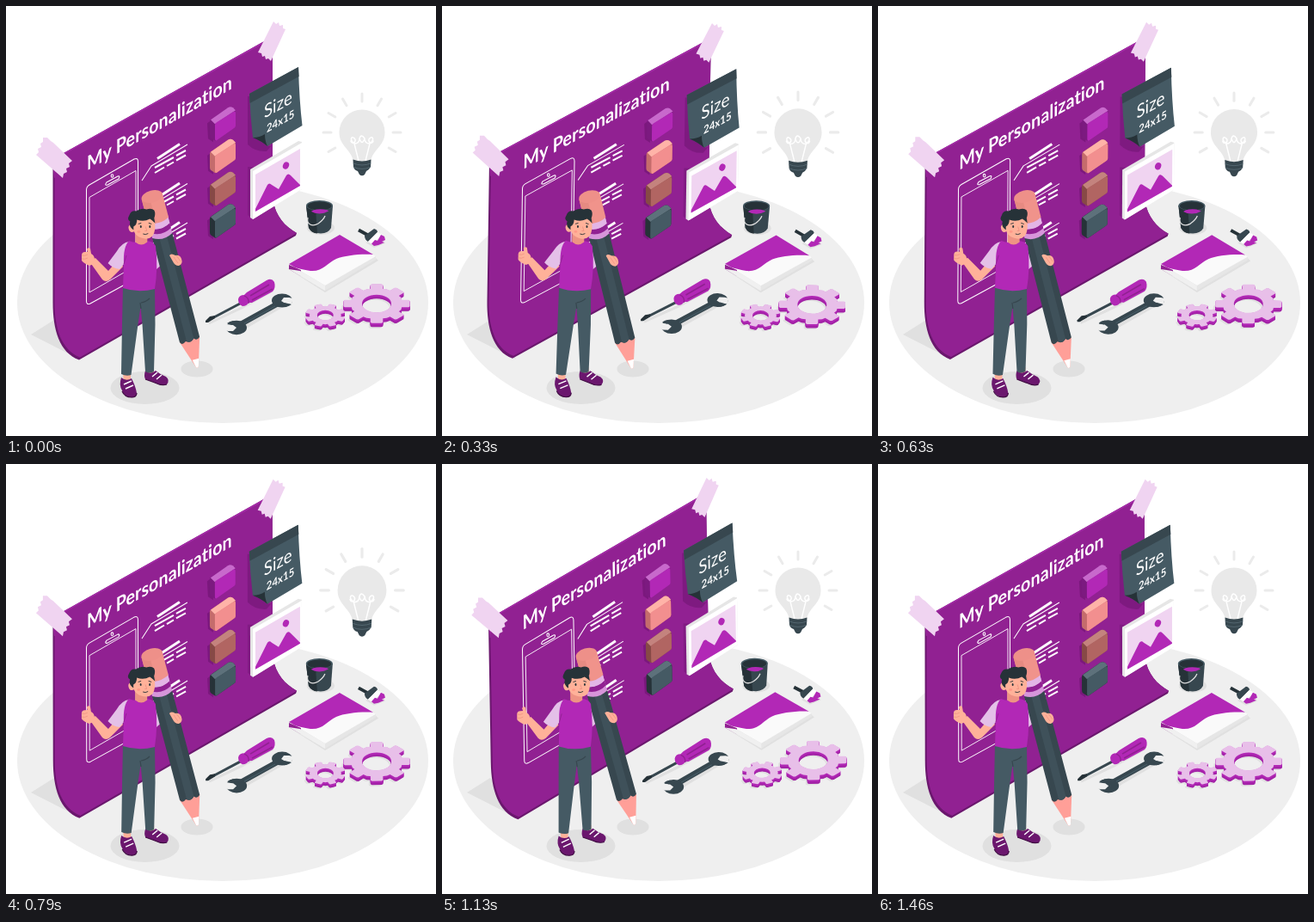
Write an HTML page with a canvas that moves like this. It is 500 px wide and 500 px high and loops after 1.5 s.

```html
<!DOCTYPE html>
<html lang="en">
<head>
<meta charset="utf-8">
<title>My Personalization</title>
<style>
html, body { margin: 0; width: 100%; height: 100%; overflow: hidden; background: #fff; }
canvas { display: block; width: 500px; height: 500px; }
</style>
</head>
<body>
<canvas id="stage"></canvas>
<script>
const LOOP = 1500;
const canvas = document.getElementById('stage');
const ctx = canvas.getContext('2d');
const ratio = window.devicePixelRatio || 1;
canvas.width = canvas.height = 500 * ratio;

const C = {
  main: '#b228b6', poster: '#912192', edge: '#6b176e', rim: '#a52ba8', pale: '#f0d4f1', gear: '#e8bfe9',
  slate: '#455a64', dark: '#37474f', ink: '#263238',
  skin: '#ffb199', skinShade: '#ee9384', floor: '#efefef', shadow: '#e0e0e0'
};

function fill(path, color) {
  ctx.fillStyle = color;
  ctx.fill(new Path2D(path));
}

function line(path, color, width = 1) {
  ctx.strokeStyle = color;
  ctx.lineWidth = width;
  ctx.stroke(new Path2D(path));
}

function oval(x, y, rx, ry, color, turn = 0) {
  ctx.beginPath();
  ctx.ellipse(x, y, rx, ry, turn, 0, Math.PI * 2);
  ctx.fillStyle = color;
  ctx.fill();
}

function group(draw) {
  ctx.save();
  draw();
  ctx.restore();
}

function shift(x, y, draw) {
  group(() => {
    ctx.translate(x, y);
    draw();
  });
}

function swing(x, y, angle, draw) {
  group(() => {
    ctx.translate(x, y);
    ctx.rotate(angle);
    ctx.translate(-x, -y);
    draw();
  });
}

function wallText(text, x, y, font) {
  group(() => {
    ctx.transform(0.866, -0.49, 0, 1, x, y);
    ctx.font = font;
    ctx.letterSpacing = '0.1px';
    ctx.fillStyle = '#fff';
    ctx.fillText(text, 0, 0);
  });
}

// Linear interpolation through [position, value] keys.
function track(keys, p) {
  const i = keys.findIndex(key => key[0] >= p);
  if (i <= 0) return keys[0][1];
  const [p0, v0] = keys[i - 1], [p1, v1] = keys[i];
  return v0 + (v1 - v0) * (p - p0) / (p1 - p0);
}

function drawFloor() {
  oval(252, 345, 239, 140, C.floor);
  fill('M29 382 L56 365 L70 380 L86 411 Z', C.shadow);
  oval(161.5, 444, 40, 19, C.shadow);
  oval(222, 422, 18.5, 9.5, C.shadow);
}

function drawPhone() {
  line('M93.5 214 Q93.5 210 97 208 L149 178 Q153.5 176 153.5 181 V308 Q153 315 149 318 L98 346 Q93.5 348 93.5 343 Z', '#fff', 1);
  line('M97 222.5 L151 191.5 V302 L97 333 Z', '#fff', 0.9);
  line('M117 205 L130 198 Q133 197 131 201 L118 208 Q114 209 117 205 Z', '#fff', 1.1);
  ctx.beginPath();
  ctx.ellipse(123.5, 197.5, 1.3, 1.8, 0, 0, 7);
  ctx.stroke();
}

function drawNotes() {
  line('M158 203 L169 186 L211 161', '#fff', 1);
  for (let i = 0; i < 3; i++) shift(0, i * 45.5, () => {
    line('M176 177.5 L202 160.5', '#fff', 3);
    if (i) line('M171 185 L211 161', '#fff', 1);
    line('M173 188 L195 176 M198 174 L209 168 M173 194 L184 187.5 M187 186 L195 181.5 M198 179.5 L209 173.5', '#fff', 2);
  });
}

function drawCube(y, front, top, side) {
  shift(0, y, () => {
    fill('M234 137 L241 132 V159 L235 155 Z', 'rgba(60,0,65,.25)');
    fill('M237 135 Q237 133 239 132 L258 119 Q261 117 264 119 L266 121 Q267 122 267 124 V140 Q267 142 265 143 L245 157 Q243 158 241 156 L238 154 Q237 153 237 151 Z', side);
    fill('M238 133 L258 119 Q261 117 264 119 L267 122 L243 138 Z', top);
    fill('M243 139 Q243 137 245 136 L264 124 Q267 122 267 125 V140 Q267 142 265 143 L245 157 Q243 158 243 155 Z', front);
  });
}

function drawNoteSheet() {
  fill('M281 105 L290 105 L292 150 L306 163 L309 162 L303 169 Q290 170 281 161 Z', 'rgba(60,0,65,.22)');
  fill('M283 102 L340 71 Q341 110 344.5 139 L304 163 Q298 157 287 153 Q284 128 283 102 Z', C.slate);
  fill('M283 102 L340 71 L340.6 82 L283.6 113 Z', C.dark);
  fill('M287 153 Q295 153 301 149 Q301 157 304 163 Q297 157 287 153 Z', C.ink);
  wallText('Size', 300, 131, '400 21.5px Lato, sans-serif');
  wallText('24x15', 303, 147.5, '700 13px Lato, sans-serif');
}

function drawPicture() {
  fill('M281 187 L288 187 V249 L281 243 Z', 'rgba(60,0,65,.18)');
  fill('M284 190 L340 157 L344 158 V213 L287 248 L284 246 Z', '#e6e6e6');
  fill('M287 192 L344 159 V213 L287 248 Z', '#fff');
  fill('M290 196 L342 166 V209 L290 239 Z', C.pale);
  fill('M290 236 L304 208 Q306 205 309 208 L317 213 L326 197 Q328 194 331 197 L342 208 V209 L290 239 Z', C.main);
  oval(325.5, 185.5, 3.5, 4.3, C.main, 0.4);
}

function drawTapes() {
  fill('M43 153 L48 153 L52 157 L55 159 L77 180 L73 183 L74 187 L70 189 L71 193 L67 195 L66 200 L35 173 L38 170 L37 166 L41 164 L40 160 L43 158 Z', C.pale);
  fill('M311 18 L314 21 L317 19 L318 23 L322 22 L322 26 L325 27 L308 64 L305 61 L302 62 L301 58 L298 59 L297 55 L293 54 Z', C.pale);
}

function drawPoster() {
  fill('M54.5 178 L310 35.5 V225 C314 245 324 256 338 264 L337 267 L85 411.5 C62 403 54.5 376 54.5 345 Z', C.edge);
  fill('M54.5 178 L310 35.5 V60 L56 200 Z', C.rim);
  fill('M56.5 178.5 L310 37.5 V225 C314 245 324 256 338 264 L86 408.5 C64 400 56.5 374 56.5 345 Z', C.poster);
  wallText('My Personalization', 94, 191.5, '700 22.7px Lato, sans-serif');
  drawPhone();
  drawNotes();
  drawCube(-0.7, C.main, '#c869cc', '#7c1a80');
  drawCube(36.8, '#f28f8f', '#ffb3a8', '#c56c6c');
  drawCube(74.8, '#b16562', '#c4837e', '#874946');
  drawCube(112.3, C.slate, '#5d717b', C.ink);
  drawNoteSheet();
  drawPicture();
  drawTapes();
}

function drawBulb() {
  ctx.lineCap = 'round';
  for (let deg = 150; deg <= 390; deg += 30) {
    const a = deg * Math.PI / 180, x = Math.cos(a), y = Math.sin(a);
    line(`M${414 + 36 * x} ${147 + 36 * y} L${414 + 45 * x} ${147 + 45 * y}`, '#ebebeb', 3);
  }
  fill('M387.5 147 A26.5 26.5 0 0 1 440.5 147 C440.5 163 426 167 424 181 H404 C402 167 387.5 163 387.5 147 Z', '#e9e9e9');
  line('M410 180 L405 160 M418 180 L423 160 M405 160 C398 154 403 150 406 155 C407 159 402 161 401 157 M423 160 C430 154 425 150 422 155 C421 159 426 161 427 157 M405 160 Q411 160 411 154 Q413 148 417 154 Q417 160 423 160 M411 154 Q414 163 417 154', '#fff', 1.4);
  fill('M403.5 178.5 Q414 182.5 424.5 178.5 L424 187 Q422 191 419 192 L417 196 Q414 198.5 411 196 L409 192 Q405 191 404 187 Z', C.dark);
  line('M404 183 Q414 187 424 183 M404.5 187.5 Q414 191.5 423.5 187.5', '#5f737d', 0.7);
}

function drawBucket() {
  oval(366, 258, 16, 8, C.shadow);
  fill('M349 232 L352 258 Q356 264.5 366 264.5 Q375 264 378 258 L380 232 Z', C.dark);
  fill('M349 232 L352 258 Q355 264 362 264.5 L360 236 Z', C.ink);
  oval(364.5, 232, 15.5, 6, C.slate);
  oval(364.5, 232.5, 14, 5, C.ink);
  group(() => {
    ctx.beginPath();
    ctx.ellipse(364.5, 232.5, 14, 9, 0, 0, Math.PI * 2);
    ctx.clip();
    oval(365.5, 240, 11, 3.8, C.main);
  });
  line('M351 246 C349 254 356 257 363 253 Q369 249 371 244', '#e0e0e0', 1.3);
}

function drawBrush() {
  fill('M418 275 L428 281 L441 276 L436 270 Z', C.shadow);
  line('M410 260.5 L421 266.5', C.ink, 3.8);
  fill('M417 267 L428 259 Q432 260 432 263 L421 274 Q417 272 417 267 Z', C.dark);
  fill('M421 274 L432 263 L437 266 L426 277 Z', '#fff');
  fill('M425 276.5 L429 272 L432 273 L436 266 L440 268 L441 272 L437 274 L440 275 L433 278 L428 279 Z', C.main);
}

function drawBoard() {
  fill('M327 305 L371 333 L433 296 L428 291 Z', C.shadow);
  fill('M329 300 L388 266 L430 291 V295 L371 331 L329 306 Z', '#e6e6e6');
  fill('M329 300 L388 266 L430 291 L371 325 Z', '#fafafa');
  fill('M329 301 L343 307 V314 L329 306 Z', C.poster);
  fill('M329 300 L388 266 L427 289 C412 288 394 290 384 294 C373 299 369 309 354 308 Q342 306 336 304 Z', C.main);
  fill('M329 306 L371 331 V325 L342 308 Z', '#f0f0f0');
}

function drawScrewdriver() {
  line('M236 369 L274 351 L310 331', C.shadow, 3);
  line('M238 364 L274 345', C.dark, 3);
  fill('M232 366 L237 361 L243 360 L243 363 L235 368 L232 368 Z', C.ink);
  fill('M270 341 Q271 336 277 336 L280 333 L303 319 Q309 316 312 321 Q314 328 310 332 L286 345 L282 345 Q280 349 275 349 Q270 347 270 341 Z', C.main);
  line('M284 337 L306 324 M286 342 L310 329', C.poster, 1.7);
  line('M277 337 Q283 339 282 346', C.poster, 1.3);
}

function drawWrench() {
  line('M273 374 L318 348', C.shadow, 8);
  line('M271 371 L318 345', C.dark, 6.5);
  oval(268, 374, 12, 8.3, C.dark);
  oval(321, 342.5, 12, 8, C.dark);
  fill('M254 376 L256 370 L264 371 L268 374 L264 378 L258 378 Z', C.floor);
  fill('M334 340 L332 347 L325 346 L320 343 L323 339 L329 339 Z', C.floor);
  fill('M257 369 Q262 365 267 367 L263 371 Z M332 347 Q325 352 319 349 L324 345 Z', C.dark);
  line('M277 369 L313 349', C.slate, 1.2);
}

function gearPath(x, y, rx, ry, holeX, holeY, turn) {
  const path = new Path2D();
  const add = (deg, r) => {
    const a = deg * Math.PI / 180;
    path.lineTo(x + rx * r * Math.cos(a), y + ry * r * Math.sin(a));
  };
  for (let i = 0; i < 8; i++) {
    const mid = i * 45 + turn;
    add(mid - 14, 0.77);
    add(mid - 11, 0.97);
    add(mid - 8, 1);
    add(mid + 8, 1);
    add(mid + 11, 0.97);
    add(mid + 14, 0.77);
    add(mid + 22.5, 0.79);
  }
  path.closePath();
  path.moveTo(x + holeX, y);
  path.ellipse(x, y, holeX, holeY, 0, 0, Math.PI * 2);
  return path;
}

function drawGear(x, y, rx, ry, holeX, holeY, depth, turn) {
  const layer = (dx, dy, color) => {
    ctx.fillStyle = color;
    ctx.fill(gearPath(x + dx, y + dy, rx, ry, holeX, holeY, turn), 'evenodd');
  };
  layer(-2, depth + 1.5, C.shadow);
  for (let d = depth; d > 0; d -= 0.5) layer(0, d, d > depth / 2 ? '#a323a7' : C.main);
  layer(0, 0, C.gear);
}

function drawTools() {
  drawBucket();
  drawBrush();
  drawBoard();
  drawScrewdriver();
  drawWrench();
  drawGear(431, 346, 39, 23, 17, 10.3, 4.5, 0);
  drawGear(371.3, 359.5, 23.5, 13.5, 9.5, 5.7, 4, 22.5);
}

function drawPencil() {
  group(() => {
    ctx.translate(169.8, 221.5);
    ctx.rotate(-0.257);
    fill('M-12 172 L12 172 L2 205 Q0 207 -1 205 Z', '#ff9f98');
    fill('M-3 196 L4.7 196 L2 205 Q0 207 -1 205 Z', '#fff');
    fill('M-12 46 H12 V172 Q8 176 5 172 Q0 177 -5 173 Q-10 177 -12 172 Z', C.dark);
    fill('M-4 46 H5 V172 Q0 177 -4 173 Z', '#3f515a');
    fill('M-12 26 H12 V47 Q0 54 -12 47 Z', '#d795da');
    fill('M-12 35 Q0 42 12 35 V41 Q0 48 -12 41 Z', C.poster);
    fill('M-12 26 V35 Q0 42 12 35 V26 Z', '#e3b5e6');
    fill('M-12.5 0 H12.5 V28 Q0 35 -12.5 28 Z', '#f0938b');
    fill('M-12.5 0 H-3 V31.3 Q-8 30 -12.5 28 Z', '#e68a82');
    oval(0, 0, 12.5, 7, '#ee9089');
  });
}

function drawShoe(path, sole, laces) {
  fill(path, C.edge);
  line(sole, '#3f0c42', 1.2);
  line(laces, '#fff', 1.4);
}

function drawLegs() {
  fill('M136 426 H145 V440 H137 Z M163 420 H172 V432 H164 Z', C.skin);
  drawShoe('M134 432 Q140 437 146 433 Q151 443 152 450 Q152 456 145 455 Q137 454 135 447 Q131 441 134 432 Z',
    'M135 448 Q138 455 146 455 Q152 455 152 450', 'M137 440 L146 436 M139 445 L148 441');
  drawShoe('M162 424 Q168 429 174 424 Q180 429 186 431 Q191 435 187 440 Q180 442 173 438 L162 434 Q160 430 162 424 Z',
    'M162 434 L173 438 Q181 442 187 440', 'M170 431 L176 426 M175 434 L181 429');
  fill('M136 325 H173 L173.5 370 L172 425 Q167 428 162 425 L158.5 370 L156.5 350 L153.5 370 L145.5 429 Q140 431 134 428 L135 370 Z', C.slate);
  line('M156 345 L157 352 M157 345 Q163 344 167 340', C.dark, 1.2);
}

function drawBody() {
  fill('M131 294 L119 308 L104 293 L97 297 L112 318 Q116 322 121 318 L136 303 Z', C.skin);
  fill('M88 290 Q88 286 92 286 L95 286 L94 283 Q95 280 98 282 L99 288 Q103 290 103 295 L104 299 L97 302 Q90 299 88 296 Z', C.skin);
  line('M88 290 Q92 291 95 289 M88 294 Q92 295 95 293', C.skinShade, 0.8);
  fill('M143 274 Q135 275 129 285 L118.5 299 Q124 305 132 306 L142 294 Z', '#e4c0e8');
  fill('M143 273 Q152 277 162 273 Q171 273 174 279 Q177 304 173 329 Q154 334 136 328 L137 300 Q136 280 143 273 Z', C.main);
  line('M137 300 L140 290', C.poster, 0.9);
}

function drawHead() {
  fill('M149 262 H163 V274 Q156 280 149 274 Z', C.skinShade);
  fill('M147 246 Q160 238 171 246 Q174 260 169 267 Q164 272 156 269 Q149 267 147 260 Z', C.skin);
  oval(145, 258, 3.7, 4.5, C.skin, -0.3);
  fill('M147 260 Q141 256 143 250 Q139 248 142 243 Q144 237 150 238 Q156 234 162 236 Q168 234 171 237 Q173 241 171 246 L172 252 Q168 248 166 247 Q159 251 151 248 Q151 254 147 256 Z', C.ink);
  oval(155.5, 256, 1, 1.5, C.ink);
  oval(166, 256, 1, 1.5, C.ink);
  line('M152.5 253 L156 251.8 M164.5 251.8 L168 253', C.ink, 0.9);
  line('M161 256 L162.5 261 L160 261', C.skinShade, 0.9);
  line('M158 264.5 Q161 266 164 264', C.ink, 0.9);
  oval(153, 262, 2, 1.4, '#ff9a89');
}

function drawMan() {
  fill('M172 278 Q180 284 183 299 L175 306 Z', '#e4c0e8');
  drawPencil();
  drawLegs();
  drawBody();
  shift(1.3, 0.5, drawHead);
  fill('M190 290 Q192 287 197 290 Q202 289 204 294 Q206 300 201 302 Q196 302 194 297 Z', C.skin);
  line('M198 290 L203 297 M195 292 L200 299', C.skinShade, 0.8);
}

function render(now) {
  const p = (now % LOOP) / LOOP;
  const sway = track([[0, 0], [0.25, 1], [0.75, -1], [1, 0]], p) * Math.PI / 180;
  const beat = track([[0, 1], [0.1, 1.1], [0.3, 1], [0.4, 1], [0.5, 1.1], [0.6, 1], [1, 1]], p);

  ctx.setTransform(ratio, 0, 0, ratio, 0, 0);
  ctx.fillStyle = '#fff';
  ctx.fillRect(0, 0, 500, 500);
  ctx.lineJoin = 'round';
  ctx.lineCap = 'butt';

  drawFloor();
  group(() => {
    ctx.translate(414, 150);
    ctx.scale(beat, beat);
    ctx.translate(-414, -150);
    drawBulb();
  });
  swing(190, 214, sway, drawPoster);
  swing(351, 305, sway, drawTools);
  swing(160, 335, sway, drawMan);
}

const start = performance.now();
function tick() {
  render(performance.now() - start);
  requestAnimationFrame(tick);
}
tick();
</script>
</body>
</html>
```
